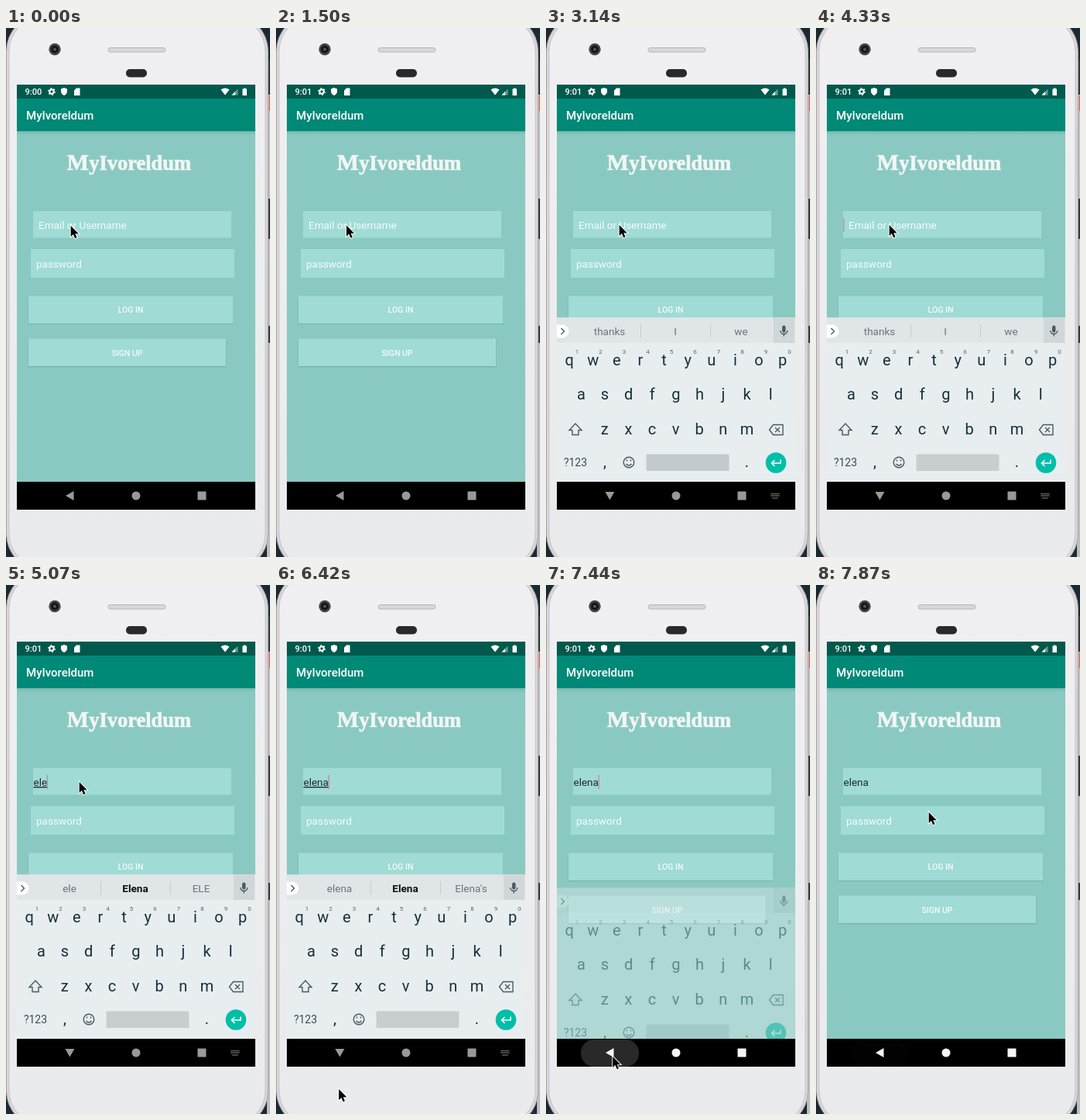
An HTML page that plays this animation: 341 px wide and 682 px high, repeating every 8000 ms.

```html
<!DOCTYPE html>
<html lang="en">
<head>
<meta charset="utf-8">
<title>Login screen</title>
<style>
  html, body { margin: 0; width: 100%; height: 100%; overflow: hidden; background: #1b2a32; }
  svg { display: block; }
  text { font-family: Roboto, sans-serif; font-size: 13.5px; white-space: pre; }
  .mid { text-anchor: middle; }
  .bold { font-weight: 500; }
  .logo { font-family: "Liberation Serif", serif; font-size: 26.5px; font-weight: 700; stroke-width: .7; }
  .button { font-size: 10.5px; font-weight: 500; fill: #f2fbf9; }
  .key { font-size: 20px; fill: #15303b; }
  .digit { font-size: 8px; fill: #55656c; }
  .line { fill: none; stroke: #4a5a62; stroke-width: 1.4; }
</style>
</head>
<body>
<svg width="341" height="682" viewBox="0 0 341 682">
  <defs>
    <linearGradient id="shade" x2="0" y2="1">
      <stop stop-color="#004a40" stop-opacity=".14"/><stop offset="1" stop-color="#004a40" stop-opacity="0"/>
    </linearGradient>
    <linearGradient id="shell" x2="0" y2="1">
      <stop stop-color="#f0f0f2"/><stop offset="1" stop-color="#e9eaec"/>
    </linearGradient>
    <clipPath id="content"><path d="M14 133H322V585H14z"/></clipPath>
  </defs>

  <!-- desktop edge -->
  <path d="M337 40h4v642h-4z" fill="#bdbec2"/>
  <path d="M339 40h2v46h-2zM339 220h2v52h-2zM339 384h2v22h-2z" fill="#33393f"/>
  <path d="M340 87h1v20h-1z" fill="#e5583d"/>

  <!-- phone shell -->
  <rect x=".5" y="-18" width="338" height="718" rx="48" fill="#d9d5d8" stroke="#a9a4a8"/>
  <rect x="4" y="-14.5" width="331" height="711" rx="45" fill="url(#shell)" stroke="#c8c4c7"/>
  <circle cx="63" cy="27.5" r="7.7" fill="#454548"/>
  <circle cx="63" cy="27.5" r="5" fill="#151517"/>
  <circle cx="63" cy="27.5" r="2" fill="#55565c"/>
  <rect x="132" y="25.5" width="74" height="5.5" rx="2.7" fill="#d8d8da" stroke="#b5b5b8"/>
  <rect x="155" y="53" width="27" height="10.5" rx="5" fill="#29292c"/>

  <!-- status and app bars -->
  <path d="M14 73H322V91H14z" fill="#00594c"/>
  <path d="M14 91H322V133H14z" fill="#008977"/>
  <g fill="#fff">
    <text id="clock" class="bold" x="24.5" y="86" style="font-size:11px"></text>
    <circle cx="59" cy="82" r="2.7" fill="none" stroke="#fff" stroke-width="2"/>
    <circle cx="59" cy="82" r="4.2" fill="none" stroke="#fff" stroke-width="1.4" stroke-dasharray="1.8 2.6"/>
    <path d="M75 77l4 1.6v3q0 3.6-4 5.4-4-1.8-4-5.4v-3z"/>
    <path d="M91 77.5h4.5v9.5H88v-6.5z"/>
    <path d="M277.5 79.5q5.5-4 11 0L283 86.5z"/>
    <path d="M291.5 86.5h8v-8z" opacity=".4"/><path d="M291.5 86.5h4.5V82z"/>
    <path d="M305.5 78.5h1.5v-1h2.5v1h1.5V87h-5.5z"/>
    <text class="bold" x="26" y="118" style="font-size:15px">MyIvoreldum</text>
  </g>

  <!-- login form -->
  <path d="M14 133H322V585H14z" fill="#8ac9c1"/>
  <path d="M14 133H322V138H14z" fill="url(#shade)"/>
  <text class="logo mid" x="159" y="182.5" fill="#f1f6f5" stroke="#f1f6f5"><tspan font-size="30">M</tspan>yIvoreldum</text>
  <g fill="#a0dbd5">
    <path d="M35 236H291V270.5H35zM32 285H295V322H32z"/>
    <path d="M28.5 347H294V382H28.5zM28.5 402H284.5V437.3H28.5z" fill="#72b3aa"/>
    <path d="M29 345.5H293.5V381H29zM29 400.5H284V436H29z"/>
  </g>
  <text id="hint" x="42" y="259" fill="#f5fdfb">Email or Username</text>
  <text x="39" y="309" fill="#f5fdfb">password</text>
  <text class="button mid" x="161" y="367">LOG IN</text>
  <text class="button mid" x="156.5" y="422.5">SIGN UP</text>
  <text id="typed" x="35.5" y="259" fill="#1b2c2b"></text>
  <path id="caret" d="M0 245V263" stroke="#b88f9b" stroke-width="1.3"/>

  <!-- keyboard -->
  <g clip-path="url(#content)"><g id="keyboard">
    <path d="M14 373.5H322V590H14z" fill="#e8edf0"/>
    <path d="M14 373.5H322V406H14z" fill="#e0e5e7"/>
    <path d="M294 373.5H321V406H294z" fill="#d1d7d9"/>
    <path d="M14 382.5h7a8.5 8.5 0 0 1 0 17h-7z" fill="#fff"/>
    <path d="M19.5 387l4 4-4 4" class="line"/>
    <g id="words" fill="#69757a">
      <path d="M122.5 382v17M212.5 382v17" stroke="#c5cccf"/>
      <text class="mid" x="82" y="395.5"></text>
      <text class="mid" x="167" y="395.5"></text>
      <text class="mid" x="252" y="395.5"></text>
    </g>
    <rect x="305" y="383.5" width="4.5" height="9" rx="2.2" fill="#4a5a62"/>
    <path d="M302.8 390a4.5 4.5 0 0 0 9 0M307.3 394.5v3" class="line"/>
    <g id="keys"></g>
    <path class="line" d="M38 510l8 8.5h-4v6h-8v-6h-4z"/>
    <path class="line" d="M293.5 511.5H306v13H293.5L288.5 518zM296 515l6 6m0-6l-6 6"/>
    <text class="mid" x="38" y="565" fill="#3a4c55" style="font-size:14px">?123</text>
    <circle class="line" cx="107" cy="560" r="6.8"/>
    <path class="line" d="M103.5 562q3.5 4 7 0M104.5 556.5v2m5-2v2"/>
    <rect id="space" x="129.5" y="549.5" width="107" height="21.5" rx="1.5"/>
    <circle cx="297" cy="560.5" r="13.3" fill="#00bfa8"/>
    <path d="M303 556.5v4.5H291.5m4-4l-4 4 4 4" fill="none" stroke="#fff" stroke-width="1.6"/>
  </g></g>

  <!-- navigation bar -->
  <path d="M14 585H322V621H14z"/>
  <rect id="ripple" x="45" y="586" width="75" height="35" rx="17" fill="#292929"/>
  <g id="nav">
    <path id="back" d="M77 603l10.5-6v12z"/>
    <circle cx="168" cy="603" r="5.5"/>
    <rect x="247.5" y="597.5" width="11" height="11" rx=".5"/>
    <path id="switcher" d="M290.5 600.5h11m-11 2.5h11m-9 3h7" fill="none" stroke="#8d8d8d" stroke-width="1.5" stroke-dasharray="1.3 .7"/>
  </g>

  <path id="pointer" d="M0 0V14l3.2-3 2.3 5.2 2.3-1-2.2-5h4.5z" stroke="#fff" stroke-width="1.8" paint-order="stroke"/>
</svg>
<script>
const LOOP = 8000;
const $ = id => document.getElementById(id);
const set = (id, name, value) => $(id).setAttribute(name, value);
const show = (id, opacity) => set(id, "opacity", +opacity);

// Each track lists [start time, ...values]; values hold until the next start.
const at = (track, t) => track.findLast(row => row[0] <= t).slice(1);

const pointer = [
  [0, 83.7, 255], [1350, 86, 255], [1500, 91, 254.5], [1650, 94.7, 254],
  [6270, 87, 470], [6420, 81.2, 650], [6710, 82, 641], [6850, 84, 626], [7000, 85.5, 612],
  [7150, 86.2, 608], [7590, 106, 500], [7740, 134, 355], [7870, 145.7, 293]
];
const caret = [
  [0, 0], [2390, 1], [2840, 0], [3290, 1], [3880, 0], [4330, 1],
  [5970, 0], [6420, 1], [6850, 0], [7290, 1], [7740, 0]
];
const typing = [
  [0, "", "thanks", "I", "we"],
  [4480, "e", "e", "even", "every"],
  [4620, "el", "el", "else", "El"],
  [5070, "ele", "ele", "Elena", "ELE"],
  [5220, "elen", "elen", "Elena", "Elen"],
  [5520, "elena", "elena", "Elena", "Elena's"]
];
// offset, opacity
const keyboard = [[0, 0, 0], [3140, 0, 1], [7290, 1, 1], [7440, 17, .4], [7590, 22, 0]];
// back-arrow angle, keyboard switcher opacity
const nav = [[0, 0, 0], [2690, -60, .5], [2840, -90, 1], [7290, 0, 0]];
const ripple = [[0, 0], [7150, .5], [7290, 1], [7590, .6], [7740, .3], [7870, .05]];

const label = (cls, x, y, s) => `<text class="${cls} mid" x="${x}" y="${y}">${s}</text>`;
const row = (letters, x, y) => [...letters].map((c, i) => label("key", x + 30.6 * i, y, c)).join("");
$("keys").innerHTML = row("qwertyuiop", 30.2, 435) + row("asdfghjkl", 45.4, 479) +
  row("zxcvbnm", 75.8, 524) + label("key", 76, 566, ",") + label("key", 259.3, 566, ".") +
  [..."1234567890"].map((c, i) => label("digit", 40 + 30.5 * i, 420, c)).join("");

const typed = $("typed");
const words = $("words").querySelectorAll("text");

function draw(t) {
  const closing = t >= 7290;
  $("clock").textContent = t < 150 ? "9:00" : "9:01";
  set("pointer", "transform", `translate(${at(pointer, t)})`);

  const [text, ...suggestions] = at(typing, t);
  typed.textContent = text;
  typed.style.textDecoration = closing ? "none" : "underline";
  show("hint", !text);
  show("caret", at(caret, t)[0]);
  const end = text ? typed.getComputedTextLength() : 0;
  set("caret", "transform", `translate(${35.8 + end})`);

  const corrected = text.length > 2;
  words.forEach((word, i) => {
    const strong = i === 1 && corrected;
    word.textContent = suggestions[i];
    word.style.fontWeight = strong ? 700 : 400;
    word.style.fill = strong ? "#0b1215" : "";
  });
  show("words", !closing);

  const [offset, opacity] = at(keyboard, t);
  set("keyboard", "transform", `translate(0 ${offset})`);
  show("keyboard", opacity);
  set("space", "fill", t < 3290 ? "#c2cacd" : "#c8cdd0");

  const [angle, switcher] = at(nav, t);
  set("back", "transform", `rotate(${angle} 82.4 603)`);
  show("switcher", switcher);
  set("nav", "fill", closing ? "#f5f5f5" : "#999");
  show("ripple", at(ripple, t)[0]);
}

const start = performance.now();
function tick() {
  draw((performance.now() - start) % LOOP);
  requestAnimationFrame(tick);
}
tick();
</script>
</body>
</html>
```
